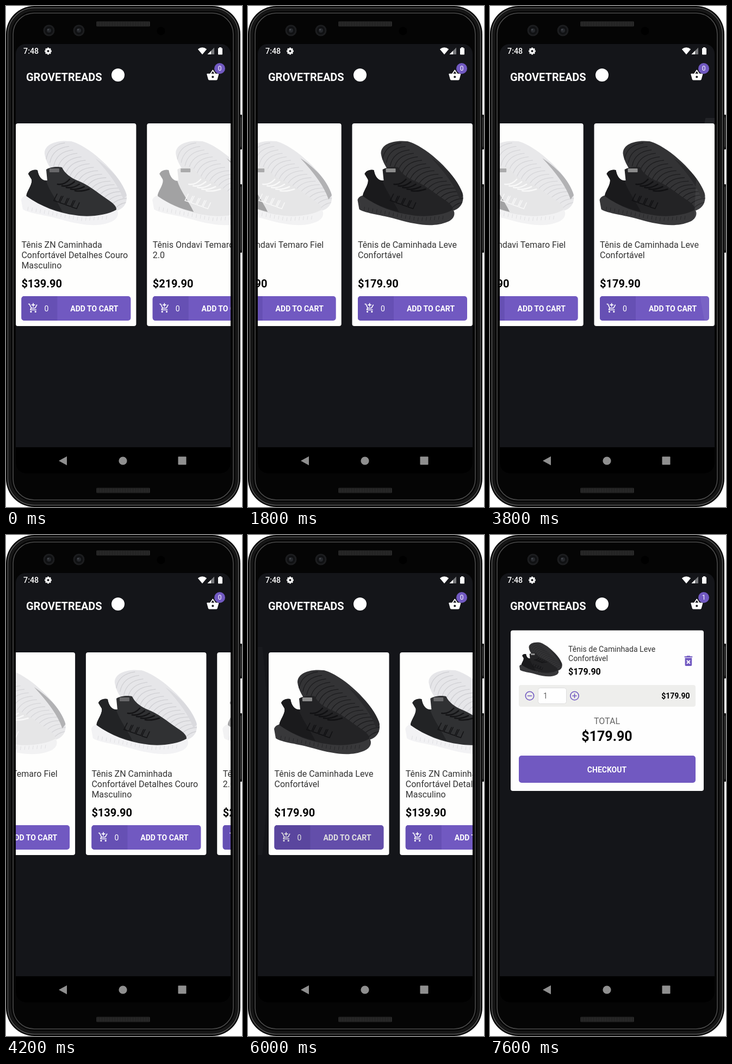
Write an HTML page that moves like this. It is 434 px wide and 922 px high and loops after 8000 ms.

```html
<!DOCTYPE html>
<html lang="pt">
<head>
<meta charset="utf-8">
<title>Shoe shop</title>
<style>
html, body { margin: 0; width: 100%; height: 100%; overflow: hidden; background: #fff; }
svg { display: block; width: 434px; height: 922px; }
text { font-family: Roboto, sans-serif; fill: #fff; white-space: pre; }
.b { font-weight: 700; }
.name { font-size: 16px; fill: #333; }
.price { font-size: 20px; font-weight: 700; fill: #000; }
.mid { text-anchor: middle; }
</style>
</head>
<body>
<svg id="stage" viewBox="0 0 434 922"></svg>
<script>
const BG = '#141519', PURPLE = '#7159c1', LOOP = 8000, TICK = 200;

const ICON = {
  basket: 'M17.21 9l-4.38-6.56c-.19-.28-.51-.42-.83-.42-.32 0-.64.14-.83.43L6.79 9H2c-.55 0-1 .45-1 1 0 .09.01.18.04.27l2.54 9.27c.23.84 1 1.46 1.92 1.46h13c.92 0 1.69-.62 1.93-1.46l2.54-9.27L23 10c0-.55-.45-1-1-1h-4.79zM9 9l3-4.4L15 9H9zm3 8c-1.1 0-2-.9-2-2s.9-2 2-2 2 .9 2 2-.9 2-2 2z',
  cart: 'M11 9h2V6h3V4h-3V1h-2v3H8v2h3v3zm-4 9a2 2 0 1 0 0 4 2 2 0 0 0 0-4zm10 0a2 2 0 1 0 0 4 2 2 0 0 0 0-4zM7.17 14.75l.03-.12.9-1.63h7.45c.75 0 1.41-.41 1.75-1.03l3.86-7.01L19.42 4l-1.11 2-2.76 5H8.53L6.16 6l-1.89-4H1v2h2l3.6 7.59-1.35 2.45C4.5 15.4 5.5 17 7 17h12v-2H7.42c-.13 0-.25-.11-.25-.25z',
  trash: 'M6 19c0 1.1.9 2 2 2h8c1.1 0 2-.9 2-2V7H6v12zm2.46-7.12l1.41-1.41L12 12.59l2.12-2.12 1.41 1.41L13.41 14l2.12 2.12-1.41 1.41L12 15.41l-2.12 2.12-1.41-1.41L10.59 14zM15.5 4l-1-1h-5l-1 1H5v2h14V4z'
};

const SHOES = {
  black: { sole: '#333335', rib: '#1d1d1f', edge: '#29292b', mid: '#38383a', groove: '#252527', upper: '#232325', heel: '#1a1a1c', lace: '#111113', tag: '#8b8b8b' },
  mixed: { sole: '#e6e6e9', rib: '#d0d0d4', edge: '#dadade', mid: '#f2f2f4', groove: '#dedee1', upper: '#303133', heel: '#222325', lace: '#141416', tag: '#68686a' },
  white: { sole: '#e8e8ea', rib: '#d6d6d9', edge: '#b2b2b4', mid: '#f2f2f3', groove: '#dedee0', upper: '#e6e6e7', heel: '#a2a2a3', lace: '#f8f8f8', tag: '#aaaaab' }
};
const SOLE = 'M53 55C53 38 76 30 102 33C136 42 190 92 203 128C207 144 200 158 184 161L120 132C88 118 56 82 53 55Z';

const LEVE = { shoe: 'black', price: '$179.90', lines: ['Tênis de Caminhada Leve', 'Confortável'] };
const COURO = { shoe: 'mixed', price: '$139.90', lines: ['Tênis ZN Caminhada', 'Confortável Detalhes Couro', 'Masculino'] };
const FIEL = { shoe: 'white', price: '$219.90', lines: ['Tênis Ondavi Temaro Fiel', '2.0'] };
const PRODUCTS = [LEVE, COURO, FIEL, COURO, FIEL, LEVE];
const PITCH = 241.3, FIRST = 38;

// [time, value]: each value holds until the next step
const SCROLL = [[0, 744], [1400, 800], [1600, 970], [1800, 1053], [4000, 920], [4200, 615], [4400, 260], [4600, 0]];
const GLOW_END = [[0, 0], [2800, 40], [3000, 44], [3200, 0], [3600, 48], [3800, 37], [4000, 0]];
const GLOW_START = [[0, 0], [4600, 46], [4800, 19], [6600, 0]];
const RIPPLE = [[0, 0], [5800, .08], [6000, .12], [6200, .05], [6400, 0]];
const ADDED = 6400, OPEN = 6533;

const at = (steps, t) => steps.reduce((v, [time, val]) => t >= time ? val : v, 0);
const rect = (x, y, w, h, r, fill, more = '') =>
  `<rect x="${x}" y="${y}" width="${w}" height="${h}" rx="${r}" fill="${fill}" ${more}/>`;
const circle = (x, y, r, fill, more = '') => `<circle cx="${x}" cy="${y}" r="${r}" fill="${fill}" ${more}/>`;
const path = (d, fill, more = '') => `<path d="${d}" fill="${fill}" ${more}/>`;
const line = (d, color, w) => path(d, 'none', `stroke="${color}" stroke-width="${w}" stroke-linecap="round"`);
const text = (x, y, s, cls, size) =>
  `<text x="${x}" y="${y}" class="${cls}" ${size ? `font-size="${size}"` : ''}>${s}</text>`;
const icon = (name, x, y, k, fill) => path(ICON[name], fill, `transform="translate(${x} ${y}) scale(${k})"`);
const times = (n, f) => Array.from({ length: n }, (_, i) => f(i)).join('');

function shoe(id) {
  const c = SHOES[id];
  return `<g id="shoe-${id}">` + path(SOLE, c.sole) +
    '<g clip-path="url(#sole)">' +
    times(18, i => line(`M${56 + i * 7} ${66 + i * 6}q${4 + i * .5} -26 ${34 + i * .6} ${-30 + i * .4}`, c.rib, 1.3)) +
    path('M146 64C176 84 196 106 204 132L198 140C190 116 172 92 146 64Z', c.edge) + '</g>' +
    path('M10 141C11 136 16 133 22 132C45 152 80 165 112 168C145 170 170 160 185 158C191 165 188 176 176 181C150 192 120 187 84 177C54 168 24 166 13 158Z', c.mid) +
    times(20, i => line(`M${22 + i * 7.6} ${160 + i * 1.5 - Math.max(0, i - 13) * 2}l1 -6`, c.groove, .9)) +
    path('M20 134C18 128 32 112 29 103L23 93C25 87 34 84 40 86C42 98 48 106 58 105L56 85C63 80 77 79 85 81C90 92 101 100 113 105C132 112 150 127 166 138C178 146 186 152 185 159C166 170 132 173 110 169C78 165 46 153 20 134Z', c.upper) +
    path('M20 134C18 128 32 112 29 103L23 93C25 87 34 84 40 86C42 98 48 106 56 106C61 123 76 142 86 163C61 157 40 148 20 134Z', c.heel) +
    rect(62, 83, 18, 7, 1, c.tag) +
    times(5, i => line(`M${77 + i * 8} ${112 + i * 3}q12 2 ${22 + i} ${-9 + i * 1.5}`, c.lace, 2.6)) +
    times(4, i => line(`M${76 + i * 11} ${130 + i * 4}l-6 12 9 3 5 -11`, c.lace, 1.6)) + '</g>';
}

function card(p, i) {
  return `<g transform="translate(${FIRST + i * PITCH} 0)">` +
    rect(0, 216, 221.5, 373, 4, '#fefefd') +
    `<use href="#shoe-${p.shoe}" y="216"/>` +
    p.lines.map((s, n) => text(10.5, 444.5 + n * 19, s, 'name')).join('') +
    text(10.5, 518, p.price, 'price') +
    rect(10.5, 534, 201, 45, 5, PURPLE) +
    path('M76.5 534H15.5a5 5 0 0 0-5 5v35a5 5 0 0 0 5 5h61z', '#6650b4') +
    icon('cart', 22.2, 546, .83, '#fff') +
    `<text x="52.5" y="562" font-size="14"${i ? '' : ' id="count"'}>0</text>` +
    text(144.5, 562, 'ADD TO CART', 'b mid', 14) +
    (i ? '' : rect(10.5, 534, 201, 45, 5, '#000', 'id="ripple" opacity="0"')) + '</g>';
}

const header = n => text(37, 138, 'GROVETREADS', 'b', 20) + circle(206, 127, 12, '#fff') +
  icon('basket', 368.3, 115.5, 1, '#fff') + circle(393, 115, 10, PURPLE) +
  `<text x="393" y="119.3" class="mid badge" font-size="12">${n}</text>`;

const ring = (x, plus) => circle(x, 296, 7.7, 'none', `stroke="${PURPLE}" stroke-width="1.6"`) +
  line(`M${x - 3.6} 296h7.2${plus ? `M${x} 292.4v7.2` : ''}`, PURPLE, 1.6);

const cartPage = rect(18, 97, 395, 715, 0, BG) + header(1) +
  rect(38, 175.5, 355, 295.5, 4, '#fefefe') +
  '<use href="#shoe-black" transform="translate(50 184.5) scale(.405)"/>' +
  LEVE.lines.map((s, n) => text(144, 215 + n * 17, s, 'name" style="font-size:14.1px')).join('') +
  text(144, 257, LEVE.price, 'price" style="font-size:16px') +
  icon('trash', 352.3, 219, 1.05, PURPLE) +
  rect(53, 276, 325, 40, 4, '#eeeeec') + ring(73) + ring(155.5, true) +
  rect(88.5, 281.5, 52, 29, 4, '#fff', 'stroke="#ddd"') +
  text(98, 301, '1', 'name" style="font-size:14px;fill:#666') +
  text(367.5, 301, LEVE.price, 'price" text-anchor="end" style="font-size:14px') +
  text(215, 348, 'TOTAL', 'name mid" style="fill:#666') +
  text(215, 379, LEVE.price, 'price mid" style="font-size:25px') +
  rect(53, 406, 325, 50, 5, PURPLE) + text(215, 436.5, 'CHECKOUT', 'b mid', 14);

const speaker = y => rect(166, y, 99, 10, 2, '#1c1c1c') +
  times(33, i => rect(167 + i * 3, y + 1, 1.2, 8, 0, '#333'));
const lens = x => circle(x, 45, 10.5, '#1c1d1f') + circle(x, 45, 7.5, '#101113') +
  circle(x, 45, 4, '#25272b') + circle(x - 1.5, 43.5, 1.5, '#45484d');

// A bezel line parallel to the phone's outline
const bezel = (inset, color, w) => rect(inset, inset, 431 - 2 * inset, 922 - 2 * inset, 52 - inset, 'none',
  `stroke="${color}" stroke-width="${w}"`);
const button = (y, h) => rect(430, y, 4, h, 1, '#1c1c1c') + rect(431, y + 5, 1.5, h - 10, 0, '#444');

const phone = button(200, 64) + button(328, 126) + rect(0, 0, 431, 922, 52, '#050505') +
  bezel(3.5, '#4c4c4c', 2) + bezel(7.5, '#171717', 4) + bezel(13, '#4a4a4a', 1.6) +
  speaker(28) + speaker(886.5) + lens(79) + lens(134) + circle(285, 46, 7.5, '#000');

const gear = times(8, i => rect(76, 76.6, 3, 4, .5, '#fff', `transform="rotate(${i * 45} 77.5 83)"`)) +
  circle(77.5, 83, 3.5, 'none', 'stroke="#fff" stroke-width="2.8"');
const status = text(32, 88.3, '7:48', '" font-weight="500', 14.3) + gear +
  path('M361 89.3L352.8 79.4Q361 73 369.2 79.4Z', '#fff') +
  path('M383 76.5V89H370.5Z', '#77787b') + path('M377 82.5V89H370.5Z', '#fff') +
  rect(390, 77.5, 8, 12, 1, '#fff') + rect(392, 76, 4, 2, 0, '#fff');
const nav = rect(18, 812, 395, 48, 0, '#000') + path('M97 837L112 828.8V845.2Z', '#8f8f8f') +
  circle(215, 837, 7.6, '#8f8f8f') + rect(316.5, 829.3, 15, 15, 1, '#8f8f8f');

document.getElementById('stage').innerHTML =
  `<defs><clipPath id="sole">${path(SOLE, '#000')}</clipPath>${Object.keys(SHOES).map(shoe).join('')}
    <clipPath id="screen">${rect(18, 70, 395, 790, 18, '#000')}</clipPath></defs>` + phone +
  `<g clip-path="url(#screen)">` + rect(18, 70, 395, 790, 0, BG) +
  `<g id="home">` + rect(18, 97, 395, 715, 0, BG, 'id="back"') + header(0) +
  `<g id="list">${PRODUCTS.map(card).join('')}</g>` +
  path('', 'rgba(250,250,250,.06)', 'id="glowEnd"') + path('', 'rgba(250,250,250,.02)', 'id="glowStart"') + '</g>' +
  rect(18, 97, 395, 715, 0, '#000', 'id="shade" opacity="0"') +
  `<g id="cart">${cartPage}</g>` + status + nav + '</g>';

const el = id => document.getElementById(id);
const [home, back, list, glowEnd, glowStart, shade, cart, count, ripple] =
  ['home', 'back', 'list', 'glowEnd', 'glowStart', 'shade', 'cart', 'count', 'ripple'].map(el);
const badge = home.querySelector('.badge');
const set = (node, name, value) => node.setAttribute(name, value);
const shift = (node, x) => set(node, 'transform', `translate(${x} 0)`);

// Lens against a screen edge; w is its width at mid height.
const glow = (x, w) => w ? `M${x} 206h${w * .45}Q${x + w * 1.55} 397.5 ${x + w * .45} 589H${x}Z` : '';

// Critically damped page slide
function slide(t) {
  if (t < OPEN) return 0;
  const u = 18.26 * (t - OPEN) / 1000;
  return u > 11 ? 1 : 1 - (1 + u) * Math.exp(-u);
}

function draw(t) {
  const p = slide(t), added = t >= ADDED;
  shift(list, -at(SCROLL, t));
  set(glowEnd, 'd', glow(413, -at(GLOW_END, t)));
  set(glowStart, 'd', glow(18, at(GLOW_START, t)));
  set(ripple, 'opacity', at(RIPPLE, t));
  count.textContent = added ? 1 : 0;
  badge.textContent = p ? 1 : 0;
  set(back, 'fill', p ? '#141413' : BG);
  shift(home, -.3 * 395 * p);
  set(shade, 'opacity', .07 * p);
  shift(cart, 395 * (1 - p));
  set(cart, 'visibility', p ? 'visible' : 'hidden');
}

const start = performance.now();
function tick() {
  const t = (performance.now() - start) % LOOP;
  draw(Math.floor(t / TICK) * TICK);
  requestAnimationFrame(tick);
}
draw(0);
requestAnimationFrame(tick);
</script>
</body>
</html>
```
